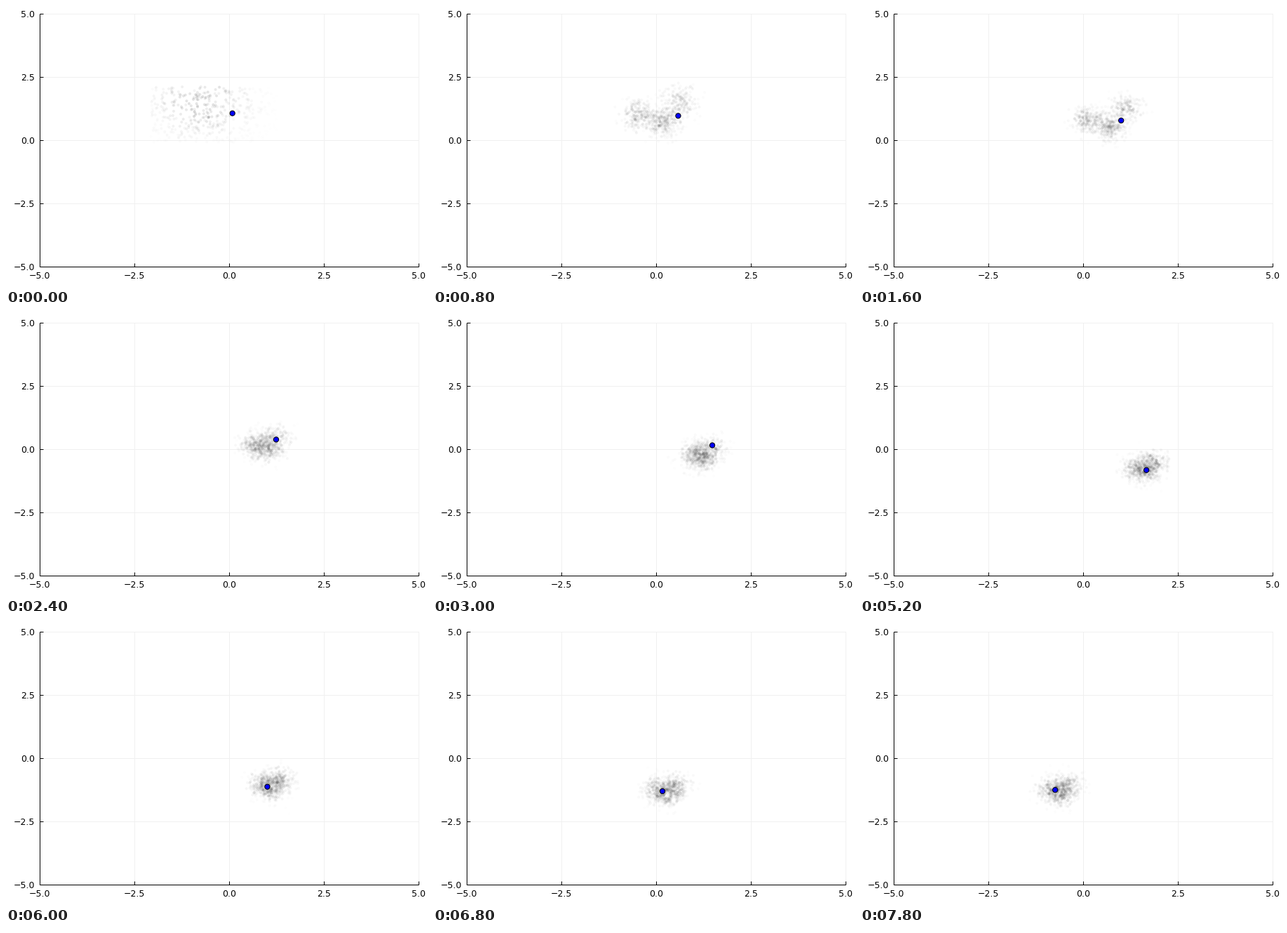
A matplotlib script for the animation above (8 s loop, 600 by 400 pixels).

```python
import numpy as np
import matplotlib.pyplot as plt
from matplotlib.animation import FuncAnimation
from matplotlib.patches import Circle

W, H, DPI = 600, 400, 100
FRAMES, STEP = 40, 200
COUNT = 700
PX = 72 / DPI  # points per pixel

# seconds, x, y of the blue marker
TRACK = np.array([
    (0.0, 322.7, 152.7), (1.6, 372.2, 163), (2.4, 385, 177.3),
    (3.8, 412.7, 195.8), (5.2, 408.2, 220.8), (6.8, 327, 238), (7.8, 278.2, 236.2),
])
# three competing guesses around the cloud centre
FAN = np.array([(-31, 0), (3, 8), (28, -19)])


def smooth(t):
    """Cubic curve through the track points."""
    times, vals = TRACK[:, 0], TRACK[:, 1:]
    t = np.clip(t, times[0], times[-1])
    i = min(np.searchsorted(times, t, side="right") - 1, len(times) - 2)
    slope = np.gradient(vals, times, axis=0)
    h = times[i + 1] - times[i]
    u = (t - times[i]) / h
    return ((2 * u**3 - 3 * u**2 + 1) * vals[i] + (u**3 - 2 * u**2 + u) * h * slope[i]
            + (3 * u**2 - 2 * u**3) * vals[i + 1] + (u**3 - u**2) * h * slope[i + 1])


def drift(rng):
    """Particle offsets that wander a little at every step."""
    z = rng.normal(size=(COUNT, 2))
    steps = []
    for _ in range(FRAMES):
        steps.append(z)
        z = 0.75 * z + 0.66 * rng.normal(size=z.shape)
    return steps


rng = np.random.default_rng(12)
offsets = drift(rng)
pick = rng.random(COUNT)
lobe = np.searchsorted([0.3, 0.75], pick)
shade = rng.uniform(0.4, 1.0, (FRAMES, COUNT))
start = rng.uniform((206, 115), (386, 194), (COUNT, 2))


def first_cloud():
    r2 = (((start - (278, 138)) / (44, 30)) ** 2).sum(axis=1)
    return start, 0.13 * np.exp(-0.5 * r2) * shade[0] * (pick < 0.6)


def cloud(k):
    if k == 0:
        return first_cloud()
    t = k * STEP / 1000
    z = offsets[k]
    # the cloud trails the marker and its error fades with time
    error = np.array([-22 * np.exp(-t / 4), 16 * np.exp(-(t - 3) ** 2)])
    centre = smooth(t - 0.2) + error
    fan = FAN * (0.4 + 0.6 / (1 + np.exp(5 * (t - 2))))
    spread = 12 + 6 * np.exp(-t / 0.8)
    pts = centre + fan[lobe] + z * (spread, 0.83 * spread)
    return pts, 0.07 * np.exp(-0.17 * (z**2).sum(axis=1)) * shade[k]


fig = plt.figure(figsize=(W / DPI, H / DPI), dpi=DPI, facecolor="white")
ax = fig.add_axes([0, 0, 1, 1])
ax.set(xlim=(0, W), ylim=(H, 0))
ax.axis("off")

LEFT, RIGHT, TOP, BOTTOM = 48, 588, 11, 371


def line(xs, ys, color="black", z=2):
    ax.plot(xs, ys, color=color, lw=PX, zorder=z, solid_capstyle="butt")


def label(x, y, value, ha):
    text = f"{value:.1f}".replace("-", "\u2212")
    ax.text(x, y, text, family="DejaVu Sans", size=9, ha=ha, va="center_baseline")


for i in range(5):
    value = -5 + 2.5 * i
    x = LEFT + 135 * i
    y = BOTTOM - 90 * i
    if i:
        line([x, x], [TOP, BOTTOM], "#f0f0f0", 0)
        line([LEFT, RIGHT], [y, y], "#f0f0f0", 0)
    line([x, x], [BOTTOM, BOTTOM - 5])
    line([LEFT, LEFT + 5], [y, y])
    label(x, 382.6, value, "center")
    label(41.3, y, value, "right")
line([LEFT, LEFT], [TOP, BOTTOM])
line([LEFT, RIGHT], [BOTTOM, BOTTOM])

dots = ax.scatter(*start.T, s=(4 * PX) ** 2, linewidths=0, zorder=3)
marker = ax.add_patch(Circle((0, 0), 3.6, fc="blue", ec="black", lw=PX, zorder=4))


def draw(k):
    pts, alpha = cloud(k)
    colors = np.zeros((COUNT, 4))
    colors[:, 3] = alpha
    dots.set_offsets(pts)
    dots.set_facecolors(colors)
    marker.center = smooth(k * STEP / 1000)
    return dots, marker


anim = FuncAnimation(fig, draw, frames=FRAMES, interval=STEP, repeat=True,
                     repeat_delay=0, init_func=lambda: draw(0))
plt.show()
```
